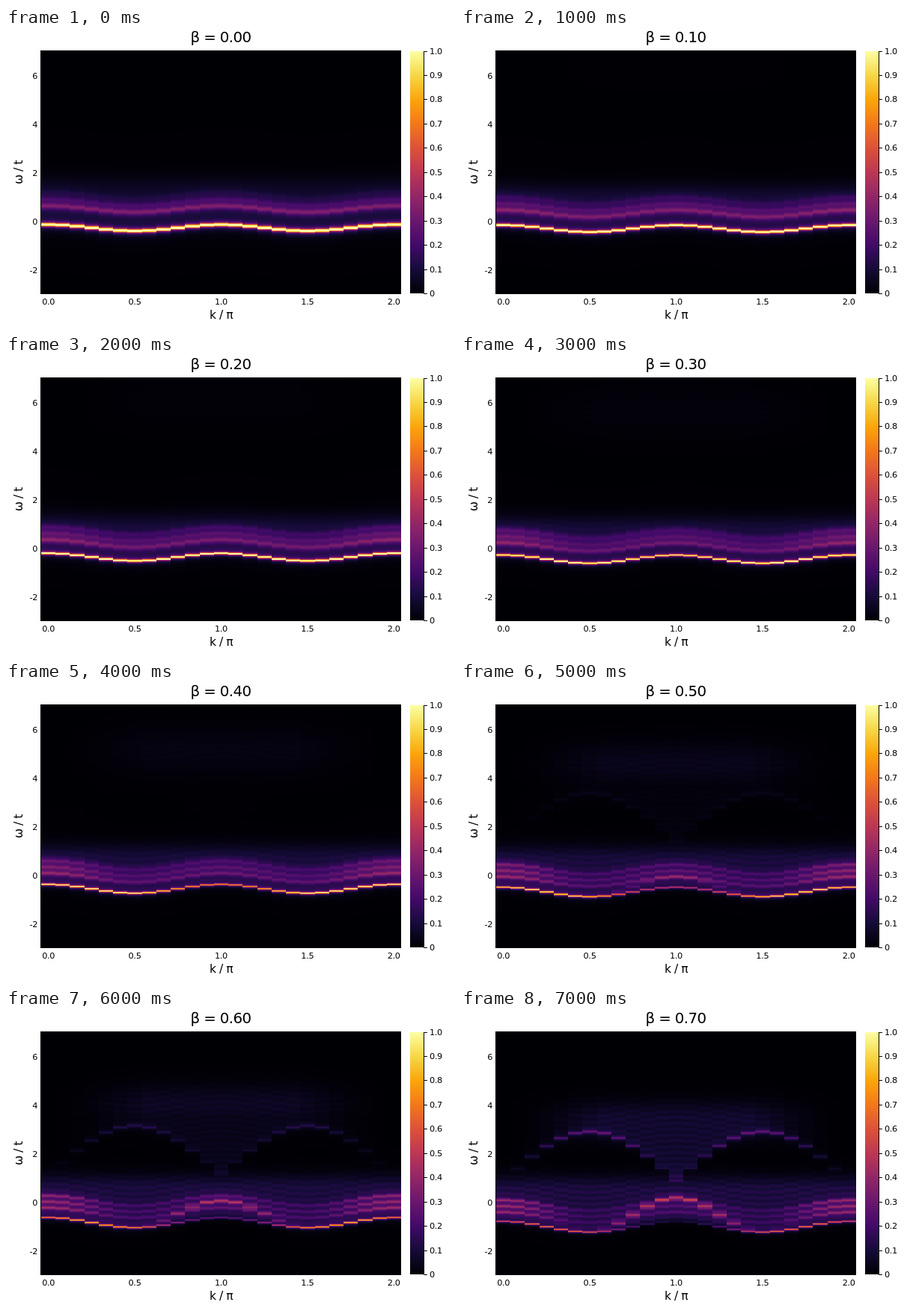
Animation of 600 by 400 pixels, one loop 8 s. Source, as an HTML page with a canvas:

```html
<!DOCTYPE html>
<html>
<head>
<meta charset="utf-8">
<style>
html, body { margin: 0; width: 100%; height: 100%; overflow: hidden; background: #fff; }
canvas { display: block; }
</style>
</head>
<body>
<canvas id="stage" width="600" height="400"></canvas>
<script>
const ctx = document.getElementById('stage').getContext('2d');
const LEFT = 47, TOP = 31, WIDTH = 481, BOTTOM = 355, COLUMNS = 25, STEPS = 8;
const inferno = '000004 160b39 420a68 6a176e 932667 bc3754 dd513a f37819 fca50a f6d746 fcffa4'
  .split(' ').map(h => [0, 2, 4].map(i => parseInt(h.substr(i, 2), 16)));

const clamp = v => Math.max(0, Math.min(1, v));
const lerp = (a, b, f) => a + (b - a) * f;
const gauss = x => Math.exp(-x * x);
const lorentz = (d, w) => w * w / (d * d + w * w);

function color(v) {
  const x = clamp(v) * 10, i = Math.min(9, Math.floor(x));
  return `rgb(${inferno[i].map((a, j) => Math.round(lerp(a, inferno[i + 1][j], x - i)))})`;
}

// Returns the brightness along one column; g runs from 0 to 1 with beta.
function spectrum(g, k) {
  const c = Math.cos(k), s = Math.abs(Math.sin(k));
  const right = Math.max(0, -c) ** 2;
  const soft = Math.sqrt(g), late = clamp((g - .55) / .45);

  // Sharp lowest band
  const crest = 263 + 21 * g ** 1.8, depth = 8.5 + 6 * g;
  const mainY = crest + depth * s * s;
  const mainWidth = lerp(1.6, 1, soft);
  const main = (1.6 - 1.05 * g) * (1 - .85 * g * g * right)
    * (1 + .5 * clamp(2 * g - .8) * c * s);

  // Ladder of weaker copies above it
  const rungs = [0, 1, 2].map(j => ({
    y: mainY - lerp(25 + 9 * j, 12 + 8 * j, soft),
    strength: .28 * lerp(.4 ** j, 1, g) * (1 - g * (.8 * s * s + .6 * right)),
    width: lerp(4, 2, g)
  }));
  // Branch that splits off and rises towards k = pi
  rungs.push({
    y: lerp(crest + depth, lerp(265, 252, late), c * c),
    strength: late * Math.max(0, .15 - .22 * c),
    width: 1.8
  });

  // Diffuse glow, upper arch and the cloud resting on it
  const edge = 218 + 25 * soft, glow = .05 + .06 * soft;
  const archY = lerp(140, 164, late) + 67 * (1 - s);
  const arch = .25 * late * late * s ** 1.3;
  const cloudY = 40 + 108 * g ** 1.3;
  const cloud = .08 * g * g * clamp(.8 * (1 - c));

  return y => {
    const above = 1 / (1 + Math.exp((y - mainY + 2) / 1.5));
    const stripes = 1 + .18 * g * Math.sin((y - mainY) * .8);
    const haze = gauss((y - cloudY) / (38 - 14 * g));
    const fill = y > cloudY && y < archY ? late : 0;
    let low = glow * stripes * (y < edge ? gauss((y - edge) / 19) : 1);
    for (const r of rungs) low += r.strength * lorentz(y - r.y, r.width);
    return main * lorentz(y - mainY, mainWidth) + low * above
      + arch * lorentz(y - archY, 1.7)
      + cloud * stripes * Math.max(haze, fill);
  };
}

function text(str, x, y, size, align = 'center') {
  ctx.font = `${size}px "DejaVu Sans", sans-serif`;
  ctx.letterSpacing = `${-.03 * size}px`;
  ctx.textAlign = align;
  ctx.fillText(str, x, y);
}

function drawAxes(step) {
  ctx.fillStyle = '#000';
  text(`β = ${(step / 10).toFixed(2)}`, 287, 18.5, 19.8);
  text('k / π', 287.5, 389, 15.6);
  for (let i = 0; i < 5; i++) {
    text((i / 2).toFixed(1), 56.6 + i * 115.4, 370, 11.3);
    text(String(6 - 2 * i), 42, 68 + i * 65, 11.3, 'right');
  }
  ctx.save();
  ctx.translate(22, 193);
  ctx.rotate(-Math.PI / 2);
  text('ω / t', 0, 0, 15.6);
  ctx.restore();

  for (let y = TOP; y < BOTTOM; y++) {
    ctx.fillStyle = color((BOTTOM - y - .5) / (BOTTOM - TOP));
    ctx.fillRect(540, y, 18, 1);
  }
  ctx.fillStyle = '#000';
  ctx.fillRect(558, TOP, 1, BOTTOM - TOP);
  for (let i = 0; i <= 10; i++) {
    const y = BOTTOM - i * 32.45;
    ctx.fillRect(558, Math.round(y), 5, 1);
    text(i ? (i / 10).toFixed(1) : '0', 566, y + 4, 11.3, 'left');
  }
}

function draw(step) {
  ctx.fillStyle = '#fff';
  ctx.fillRect(0, 0, 600, 400);
  drawAxes(step);
  ctx.fillRect(LEFT - 1, TOP - 1, WIDTH + 1, BOTTOM - TOP + 2);
  const columnX = i => Math.round(LEFT + i * WIDTH / COLUMNS);
  for (let i = 0; i < COLUMNS; i++) {
    const value = spectrum(step / (STEPS - 1), i * Math.PI / 12);
    for (let y = TOP; y < BOTTOM; y++) {
      ctx.fillStyle = color(value(y + .5));
      ctx.fillRect(columnX(i), y, columnX(i + 1) - columnX(i), 1);
    }
  }
}

let shown = -1;
function tick() {
  const step = Math.floor(performance.now() / 1000) % STEPS;
  if (step !== shown) draw(shown = step);
  requestAnimationFrame(tick);
}
tick();
</script>
</body>
</html>
```
